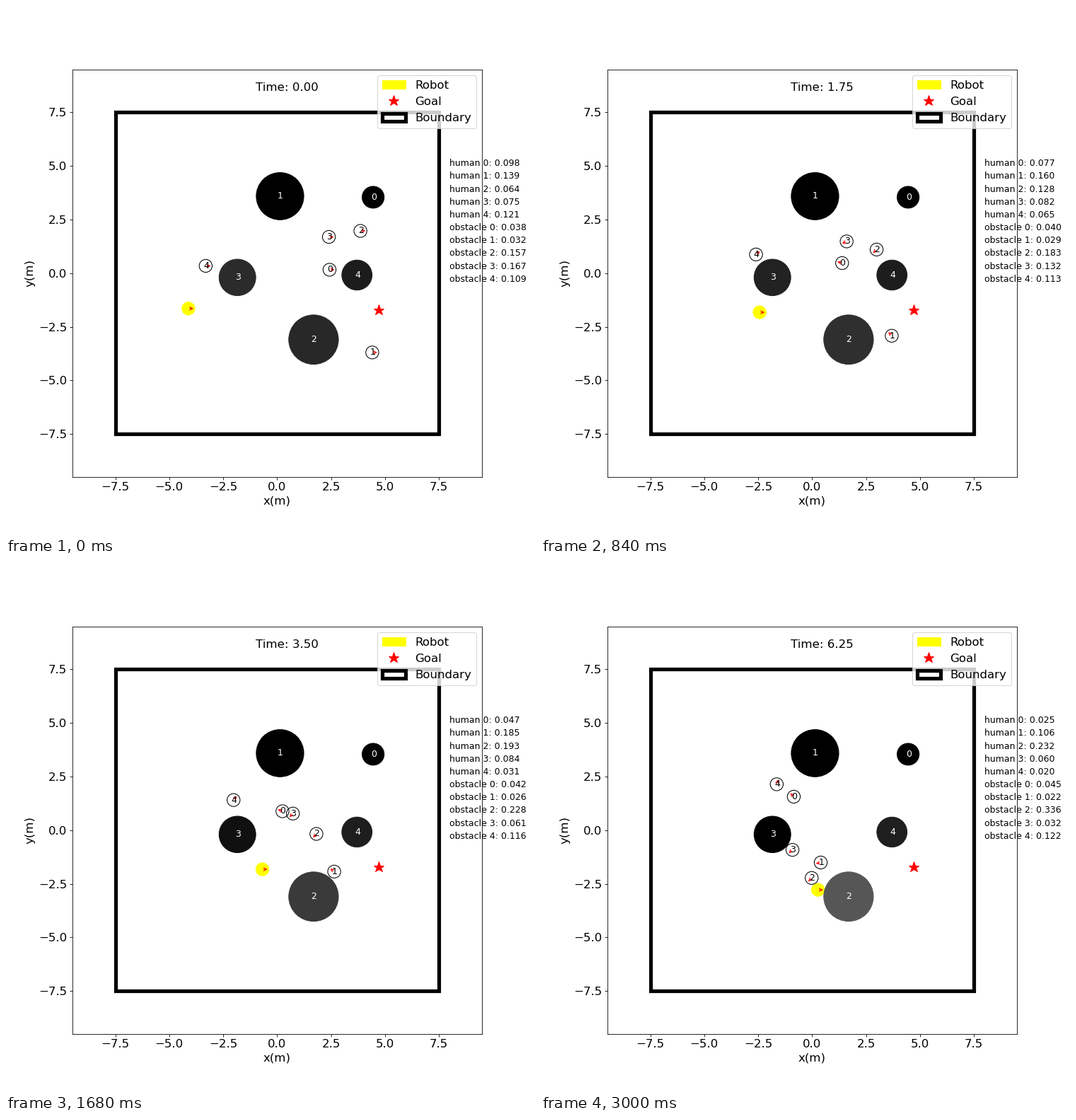
A matplotlib script that plays this animation: 748x748 px, repeating every 3.12 s.

```python
import numpy as np
import matplotlib.pyplot as plt
from matplotlib.animation import FuncAnimation
from matplotlib.lines import Line2D
from matplotlib.patches import ArrowStyle, Circle, FancyArrowPatch, Rectangle

plt.rcParams["font.family"] = "DejaVu Sans"

FRAMES, INTERVAL, DT = 26, 120, 0.25
RADIUS, OFFSET = 0.3, 0.11
STEPS = np.arange(FRAMES)
KEYS = [0, 7, 17, 25]
LAG = 2.0  # steps a human loses while picking up speed


def curve(values, clock=STEPS):
    """Line through two end values, or cubic through four key values."""
    if len(values) == 2:
        return np.linspace(*values, FRAMES)
    return np.polyval(np.polyfit(clock[KEYS], values, 3), clock)


def add_arrow():
    style = ArrowStyle("->", head_length=4, head_width=2)
    return ax.add_patch(FancyArrowPatch((0, 0), (RADIUS, 0), color="red",
                                        arrowstyle=style, zorder=2))


def add_number(i, x, y, color):
    return ax.text(x - OFFSET, y - OFFSET, str(i), color=color, fontsize=12)


def aim(arrow, x, y, heading):
    tip = (x + RADIUS * np.cos(heading), y + RADIUS * np.sin(heading))
    arrow.set_positions((x, y), tip)


class Human:
    def __init__(self, i, points, weights):
        x, y = zip(*points)
        clock = STEPS - LAG * (1 - np.exp(-STEPS / LAG))
        self.x, self.y = curve(x, clock), curve(y, clock)
        self.heading = np.zeros(FRAMES)
        self.heading[1:] = np.arctan2(np.diff(self.y), np.diff(self.x))
        self.weight = curve(weights)
        self.circle = ax.add_patch(Circle((0, 0), RADIUS, fill=False,
                                          edgecolor="black", linewidth=1))
        self.arrow = add_arrow()
        self.number = add_number(i, 0, 0, "black")

    def draw(self, k):
        x, y = self.x[k], self.y[k]
        self.circle.center = x, y
        self.number.set_position((x - OFFSET, y - OFFSET))
        aim(self.arrow, x, y, self.heading[k])


class Obstacle:
    def __init__(self, i, x, y, r, weights):
        self.weight = curve(weights)
        self.circle = ax.add_patch(Circle((x, y), r))
        add_number(i, x, y, "white")

    def draw(self, k):
        """The more attention it gets, the lighter its grey."""
        weight = self.weight[k]
        self.circle.set_color(str(weight) if weight > 0.05 else "black")


class Robot:
    """Drives straight, swerves 45 degrees right at times, then stops."""

    def __init__(self, x, y):
        last = 20
        speed = np.where((STEPS > 0) & (STEPS < last), 1.0, 0.0)
        speed[last] = 0.415
        swerve = (STEPS == 6) | ((STEPS >= 15) & (STEPS <= last))
        self.heading = np.where(swerve, -np.pi / 4, 0)
        self.x = x + np.cumsum(speed * np.cos(self.heading)) * DT
        self.y = y + np.cumsum(speed * np.sin(self.heading)) * DT
        self.circle = ax.add_patch(Circle((x, y), RADIUS, color="yellow"))
        self.arrow = add_arrow()

    def draw(self, k):
        self.circle.center = self.x[k], self.y[k]
        aim(self.arrow, self.x[k], self.y[k], self.heading[k])


fig, ax = plt.subplots(figsize=(10, 10), dpi=74.8)
ax.set(xlim=(-9.5, 9.5), ylim=(-9.5, 9.5),
       xticks=np.arange(-7.5, 8, 2.5), yticks=np.arange(-7.5, 8, 2.5))
ax.tick_params(labelsize=16)
ax.set_xlabel("x(m)", fontsize=16)
ax.set_ylabel("y(m)", fontsize=16)

boundary = ax.add_patch(Rectangle((-7.5, -7.5), 15, 15, fill=False,
                                  edgecolor="black", linewidth=5))
goal = ax.add_line(Line2D([4.70], [-1.71], color="red", marker="*",
                          linestyle="None", markersize=15))
robot = Robot(-4.11, -1.65)

obstacles = [
    Obstacle(0, 4.45, 3.54, 0.51, (0.038, 0.045)),
    Obstacle(1, 0.135, 3.59, 1.10, (0.032, 0.022)),
    Obstacle(2, 1.69, -3.10, 1.15, (0.157, 0.183, 0.253, 0.336)),
    Obstacle(3, -1.84, -0.20, 0.85, (0.167, 0.132, 0.036, 0.032)),
    Obstacle(4, 3.70, -0.09, 0.70, (0.109, 0.122)),
]
humans = [
    Human(0, [(2.43, 0.16), (1.39, 0.47), (-0.14, 1.06), (-0.85, 1.56)],
          (0.098, 0.077, 0.036, 0.025)),
    Human(1, [(4.41, -3.70), (3.69, -2.92), (2.13, -1.63), (0.40, -1.51)],
          (0.139, 0.160, 0.184, 0.106)),
    Human(2, [(3.86, 1.97), (2.99, 1.10), (1.32, -0.74), (-0.02, -2.23)],
          (0.064, 0.128, 0.214, 0.232)),
    Human(3, [(2.40, 1.69), (1.60, 1.48), (0.36, 0.36), (-0.91, -0.92)],
          (0.075, 0.082, 0.082, 0.060)),
    Human(4, [(-3.31, 0.34), (-2.60, 0.87), (-1.87, 1.60), (-1.64, 2.14)],
          (0.121, 0.065, 0.023, 0.020)),
]

ax.legend([robot.circle, goal, boundary], ["Robot", "Goal", "Boundary"],
          fontsize=16, loc="upper right")
timer = ax.text(-1, 8.5, "", fontsize=16)
readouts = [ax.text(8, 5 - 0.6 * i, "", fontsize=12) for i in range(10)]


def update(k):
    timer.set_text(f"Time: {k * DT:.2f}")
    for part in [robot, *obstacles, *humans]:
        part.draw(k)
    for i in range(5):
        readouts[i].set_text(f"human {i}: {humans[i].weight[k]:.3f}")
        readouts[i + 5].set_text(f"obstacle {i}: {obstacles[i].weight[k]:.3f}")
    return []


anim = FuncAnimation(fig, update, frames=FRAMES, interval=INTERVAL,
                     repeat=True, repeat_delay=0)
plt.show()
```
